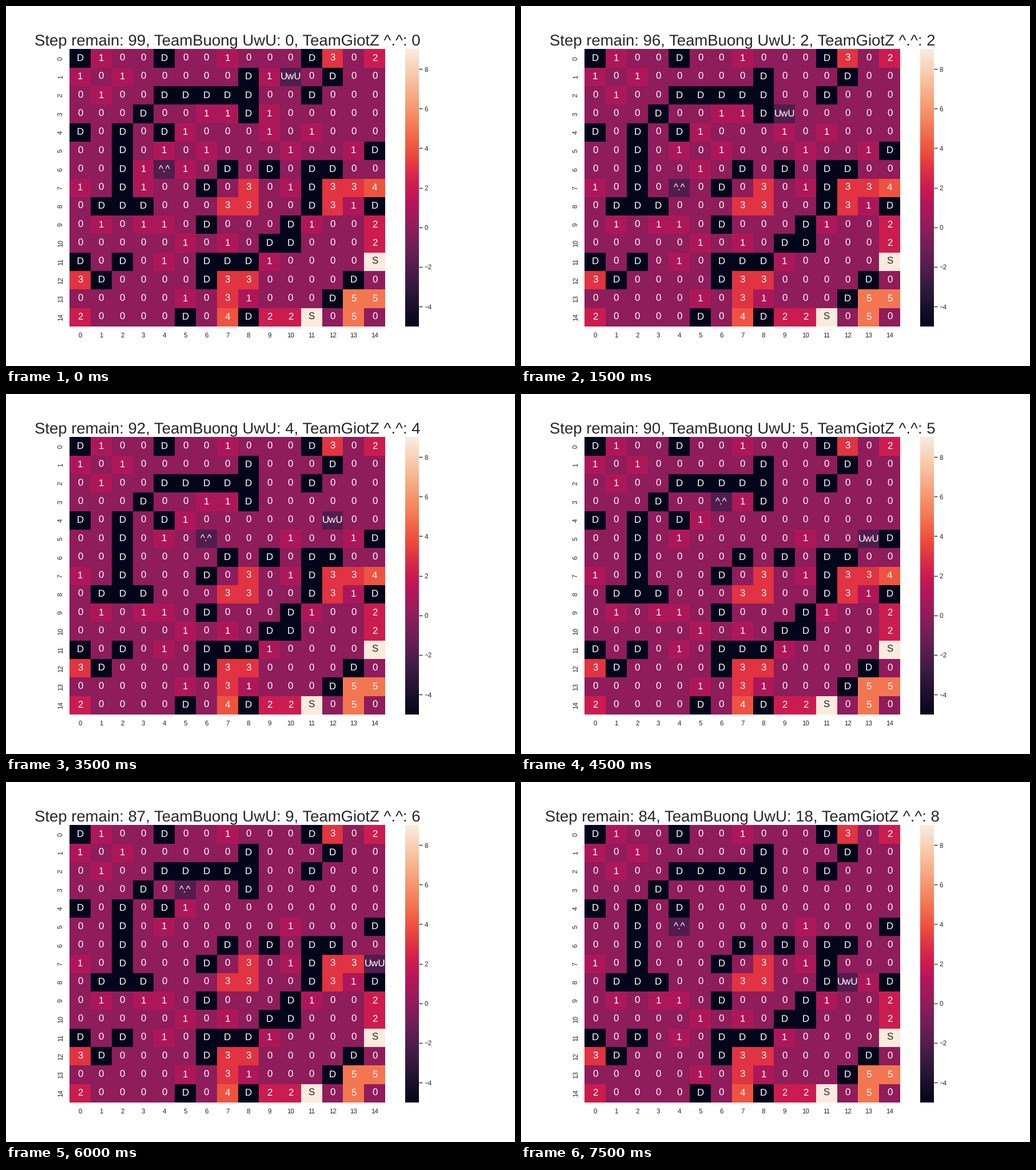
These frames come from a looping animation (890x629 px, 8000 ms). A matplotlib script:

```python
import numpy as np
import matplotlib.pyplot as plt
from matplotlib.animation import FuncAnimation
from matplotlib.colors import LinearSegmentedColormap

W, H, DPI = 890, 629, 100
K = W / 1170  # point sizes are meant for an 11.7 inch wide figure
INK = "#262626"
STEPS, INTERVAL = 16, 500

BOARD = [
    "D100D001000D302",
    "10100000D100D00",
    "0100DDDDD00D000",
    "000D0011D100000",
    "D0D0D1000101000",
    "00D01010001001D",
    "00D1010D0D0DD00",
    "10D100D0301D334",
    "0DDD0003300D31D",
    "010110D000D1002",
    "000001010DD0002",
    "D0D010DDD10000S",
    "3D0000D330000D0",
    "000001031000D55",
    "20000D04D22S050",
]
VALUE = {"D": -5, "S": 9}
AGENT = -2
MOVE = {"L": (0, -1), "R": (0, 1), "U": (-1, 0), "D": (1, 0)}
PLAYERS = [
    ("UwU", (1, 10), "LDDDRRRRDDRDLLD"),
    ("^.^", (6, 4), "LDRRURUUURLLDDL"),
]

ROCKET = [
    (0, "#03051a"), (1 / 11, "#221331"), (1 / 7, "#35193e"), (1 / 5, "#4c1d4b"),
    (2 / 7, "#701f57"), (4 / 11, "#921c5b"), (2 / 5, "#a11a5b"), (3 / 7, "#ad1759"),
    (5 / 11, "#b91657"), (1 / 2, "#cb1b4f"), (6 / 11, "#d92847"), (4 / 7, "#e13342"),
    (3 / 5, "#e83f3f"), (7 / 11, "#ed503e"), (5 / 7, "#f37651"), (4 / 5, "#f69c73"),
    (6 / 7, "#f6b48f"), (10 / 11, "#f7c9aa"), (1, "#faebdd"),
]

plt.rcParams.update({
    "font.family": "Liberation Sans",
    "text.hinting": "no_hinting",
    "text.color": INK,
    "xtick.color": INK,
    "ytick.color": INK,
})
cmap = LinearSegmentedColormap.from_list("rocket", ROCKET)


def state(step):
    """Replay the moves up to a step: values, labels and scores."""
    labels = [list(row) for row in BOARD]
    scores, spots = [], []
    for _, (r, c), path in PLAYERS:
        score = 0
        for m in path[:step]:
            r, c = r + MOVE[m][0], c + MOVE[m][1]
            score += int(labels[r][c])
            labels[r][c] = "0"
        scores.append(score)
        spots.append((r, c))
    values = np.array([[VALUE[s] if s in VALUE else int(s) for s in row] for row in labels])
    for (name, _, _), (r, c) in zip(PLAYERS, spots):
        values[r, c] = AGENT
        labels[r][c] = name
    return values, labels, scores


fig = plt.figure(figsize=(W / DPI, H / DPI), dpi=DPI, facecolor="white")
ax = fig.add_subplot()
n = len(BOARD)
mesh = ax.pcolormesh(state(0)[0], cmap=cmap, vmin=-5, vmax=9)
ax.set(xlim=(0, n), ylim=(n, 0))
bar = fig.colorbar(mesh, ax=ax)
bar.outline.set_linewidth(0)
bar.set_ticks(range(-4, 9, 2))
bar.ax.tick_params(length=6 * K, width=1.25 * K, pad=3.5 * K, labelsize=11 * K)

centers = np.arange(n) + 0.5
ax.set_xticks(centers, range(n))
ax.set_yticks(centers, range(n), rotation=90, va="center")
ax.tick_params(length=0, pad=9.5 * K, labelsize=11 * K)
for spine in ax.spines.values():
    spine.set_visible(False)

cells = [[ax.text(c + 0.5, r + 0.5, "", size=16 * K, ha="center", va="center")
          for c in range(n)] for r in range(n)]
title = ax.set_title("", size=26 * K, pad=6 * K)


def draw(step):
    values, labels, (a, b) = state(step)
    mesh.set_array(values)
    for r in range(n):
        for c in range(n):
            cells[r][c].set_text(labels[r][c])
            cells[r][c].set_color(INK if labels[r][c] == "S" else "white")
    title.set_text(f"Step remain: {99 - step}, TeamBuong UwU: {a}, TeamGiotZ ^.^: {b}")
    return [mesh, title]


anim = FuncAnimation(fig, draw, frames=STEPS, interval=INTERVAL,
                     init_func=lambda: draw(0), repeat=True, repeat_delay=0)
plt.show()
```
